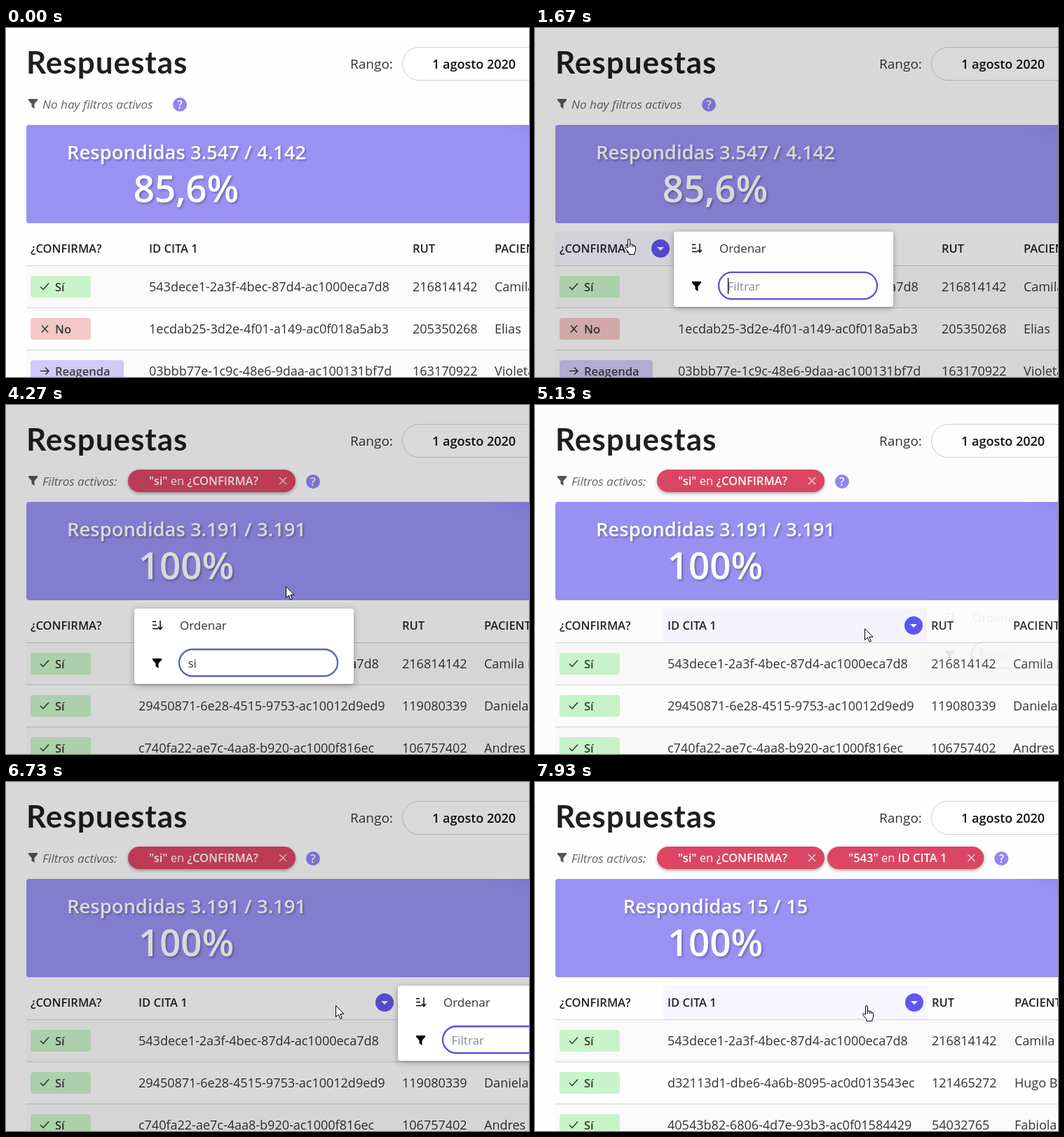
Recreate the animation shown at these times as an HTML page. Size 746 by 497 pixels, loop 8 s.

```html
<!DOCTYPE html>
<html lang="es">
<head>
<meta charset="utf-8">
<style>
html, body { margin: 0; height: 100%; overflow: hidden; background: #fefefe }
svg { display: block; font: 18px "Open Sans", sans-serif }
text { white-space: pre }
.title { font: 700 44px Lato, sans-serif; letter-spacing: 1px }
.semi { font-weight: 600 }
.small { font-size: 16.5px }
.menu { font-size: 17px }
.glow { filter: drop-shadow(2px 2px 1.5px #0004) }
.chip { filter: drop-shadow(0 2px 2px #0005) }
.panel { filter: drop-shadow(0 2px 4px #0005) }
</style>
</head>
<body>
<svg id="stage" width="746" height="497" viewBox="0 0 746 497"></svg>
<script>
const stage = document.getElementById('stage');
const pen = document.createElement('canvas').getContext('2d');
const LOOP = 8000;

// Table rows: answer, appointment id, RUT, patient
const first = ['Sí', '543dece1-2a3f-4bec-87d4-ac1000eca7d8', '216814142', 'Camila Ro'];
const second = ['Sí', '29450871-6e28-4515-9753-ac10012d9ed9', '119080339', 'Daniela E'];
const third = ['Sí', 'd32113d1-dbe6-4a6b-8095-ac0d013543ec', '121465272', 'Hugo Be'];
const all = [first,
  ['No', '1ecdab25-3d2e-4f01-a149-ac0f018a5ab3', '205350268', 'Elias'],
  ['Reagenda', '03bbb77e-1c9c-48e6-9daa-ac100131bf7d', '163170922', 'Violeta']];
const confirmed = [first, second,
  ['Sí', 'c740fa22-ae7c-4aa8-b920-ac1000f816ec', '106757402', 'Andres M']];

// id/rut: left edges of those columns
const wide = { id: 198, rut: 574, name: 697 }, tight = { id: 183, rut: 559, name: 682 };
const final = { id: 183, rut: 560, name: 684 };
const states = [
  { at: 0, ...wide, count: '3.547 / 4.142', rate: '85,6%', rows: all, typed: [] },
  { at: 2800, ...tight, count: '3.191 / 3.191', rate: '100%', rows: confirmed, typed: ['s'] },
  { at: 3000, ...tight, count: '3.191 / 3.191', rate: '100%', rows: confirmed, typed: ['si'] },
  { at: 7000, ...tight, count: '2.874 / 2.874', rate: '100%', typed: ['si', '5'],
    rows: [first, second, ['Sí', '5b1e0c47-3d92-4f0a-8c15-ac1000e92b31', '98412076', 'Ramona']] },
  { at: 7270, ...final, count: '418 / 418', rate: '100%', typed: ['si', '54'],
    rows: [first, third, ['Sí', 'c8540a17-62de-4b39-a7f1-ac0e00b7d245', '143920581', 'Nicolas']] },
  { at: 7470, ...final, count: '15 / 15', rate: '100%', typed: ['si', '543'],
    rows: [first, third, ['Sí', '40543b82-6806-4d7e-93b3-ac0f01584429', '54032765', 'Fabiola']] }
];
const columns = ['¿CONFIRMA?', 'ID CITA 1'];
const caretOn = [[1480, 2070], [2800, 3530], [4060, 4200], [5100, 5670], [6200, 6730], [7000, 7720]];
const path = [[130, 620, 505], [930, 267, 297], [1000, 267, 297], [1270, 112, 294], [1530, 112, 294],
  [1650, 131, 300], [3730, 131, 300], [4200, 399, 258], [4280, 399, 258], [4530, 217, 301],
  [4600, 217, 301], [4800, 470, 318]];

const within = (t, a, b) => t >= a && t < b;
const ramp = (t, a, b) => {
  const p = Math.min(1, Math.max(0, (t - a) / (b - a)));
  return p * p * (3 - 2 * p);
};
const rect = (x, y, w, h, r, attrs) => `<rect x="${x}" y="${y}" width="${w}" height="${h}" rx="${r}" ${attrs}/>`;
const text = (x, y, s, cls = '', fill = '#333', more = '') =>
  `<text x="${x}" y="${y}" class="${cls}" fill="${fill}" ${more}>${s}</text>`;
const line = (d, color, width = 1.5) =>
  `<path d="${d}" fill="none" stroke="${color}" stroke-width="${width}"/>`;
const shape = (d, fill, more = '') => `<path d="${d}" fill="${fill}" ${more}/>`;
const funnel = (x, y, fill) => shape(`M${x} ${y}h13v2l-4.5 5v7l-4-3v-4l-4.5-5z`, fill);
const measure = (s, weight) => {
  pen.font = `${weight} 16.5px "Open Sans", sans-serif`;
  return pen.measureText(s).width;
};

function pointer(t) {
  let i = 0;
  while (i < path.length - 2 && t >= path[i + 1][0]) i++;
  const [a, x, y] = path[i], [b, u, v] = path[i + 1];
  const p = Math.min(1, Math.max(0, (t - a) / (b - a))), e = p * (2 - p);
  return [x + (u - x) * e, y + (v - y) * e];
}

function cursor(x, y, hand) {
  const d = hand
    ? 'M4.5 13V2a1.5 1.5 0 0 1 3 0V8q3-1 3 1q2.5-1 2.5 1q2.5-.5 2.5 2V16q0 2-1.5 4V22.5H6V20L1 14q-1-2 .5-2.3T4.5 13zM7.5 8v4M10.5 9v3M13 10v2'
    : 'M.5.5V16.5L4.3 13l2.7 6.3 2.4-1-2.7-6H12z';
  return `<g transform="translate(${x - (hand ? 3 : 0)} ${y})">${shape(d, '#fff', 'stroke="#000" stroke-linejoin="round"')}</g>`;
}

function filters(typed) {
  let out = funnel(32, 101, '#555');
  out += text(52, 115, typed.length ? 'Filtros activos:' : 'No hay filtros activos', '', '#666',
    'font-style="italic" style="font-size:17.1px"');
  let x = typed.length ? 174 : 227;
  typed.forEach((word, i) => {
    const w = 83 + measure(`"${word}"`, 600) + measure(' en ', 400) + measure(columns[i], 600);
    const end = x + w;
    out += rect(x, 92, w, 32, 16, 'fill="#dc4663" class="chip"');
    out += text(x + 30, 114, `"${word}"<tspan font-weight="400"> en </tspan>${columns[i]}`, 'semi small', '#fff');
    out += line(`M${end - 23} 103l10 10m0-10l-10 10`, '#f6cdd5');
    x = end + 4;
  });
  x += 21;
  return out + `<circle cx="${x}" cy="109" r="10" fill="#9186f3"/>` +
    text(x, 115, '?', 'semi', '#fff', 'text-anchor="middle" style="font-size:16px"');
}

function answer(label, y) {
  const [fill, icon] = {
    'Sí': ['#c9f4c9', 'm49 0l4 4 8-9'],
    'No': ['#f5c7c7', 'm51-5l9 10m0-10l-9 10'],
    'Reagenda': ['#d2c9f5', 'm49 0h12m-5-5l5 5-5 5']
  }[label];
  return rect(35, y - 15.5, label === 'Reagenda' ? 133 : 86, 31, 4, `fill="${fill}"`) +
    line(`M0 ${y}${icon}`, '#333') + text(70, y + 6, label, 'semi small', '#3a3a3a');
}

function table(s, hover, tint) {
  let out = '';
  const left = [29, s.id], right = [s.id, s.rut];
  if (hover >= 0) {
    out += rect(left[hover], 290, right[hover] - left[hover], 48, 0, `fill="#f7f6ff" opacity="${tint}"`);
  }
  [[35, columns[0]], [s.id + 6, columns[1]], [s.rut + 6, 'RUT'], [s.name, 'PACIENTE']]
    .forEach(([x, label]) => out += text(x, 320, label, 'semi small', '#222'));
  if (hover >= 0) {
    const x = right[hover] - 19;
    out += `<circle cx="${x}" cy="314" r="13" fill="#6056f0"/>` + shape(`M${x - 5} 312h10l-5 5z`, '#fff');
  }
  s.rows.forEach(([label, id, rut, name], i) => {
    const y = 338 + 60 * i;
    if (i % 2 === 0) out += rect(29, y, 717, 60, 0, 'fill="#fafafa"');
    out += line(`M29 ${y + .5}H746`, '#cfd5d7', 1) + answer(label, y + 30.5);
    out += text(s.id + 6, y + 37, id) + text(s.rut + 6, y + 37, rut) + text(s.name, y + 37, name);
  });
  return out;
}

function menu(x, open, word, caret, border) {
  pen.font = '17px "Open Sans", sans-serif';
  const caretX = x + 77.5 + pen.measureText(word).width;
  return `<g opacity="${open}" transform="translate(0 ${-12 * (1 - open)})">` +
    rect(x, 290, 313, 107, 4, 'fill="#fff" class="panel"') +
    line(`M${x + 26} 308.5h5m-5 5h6m-6 5h8M${x + 37} 307v12m-3-3l3 3.5 3-3.5`, '#000') +
    text(x + 65, 320, 'Ordenar', 'menu') + funnel(x + 26, 361, '#000') +
    rect(x + 64, 348, 226, 38, 19, `fill="#fff" stroke="${border}" stroke-width="2.3"`) +
    text(x + 76.5, 374, word || 'Filtrar', 'menu', word ? '#333' : '#858b95') +
    (caret ? line(`M${caretX} 356V379`, '#000', 1.2) : '') + '</g>';
}

function draw(t) {
  const s = states.findLast(state => t >= state.at);
  const [x, y] = pointer(t);
  const second = t >= 5000;
  const open = second ? ramp(t, 5100, 5300) - ramp(t, 7720, 7930) : ramp(t, 1480, 1680) - ramp(t, 4280, 4500);
  const blurred = within(t, 3730, 4400);
  const inHeader = !blurred && y >= 290 && y < 338 && x < s.rut;
  const hover = inHeader ? +(x >= s.id) : -1;
  const hand = inHeader && !within(t, 5100, 7850);
  const center = 'text-anchor="middle"';

  let out = '<defs><linearGradient id="sheen" x1=".8" y1=".2" x2="1" y2="0">' +
    '<stop stop-color="#8f86f0" stop-opacity="0"/><stop offset="1" stop-color="#8f86f0"/></linearGradient></defs>';
  out += rect(0, 0, 746, 497, 0, 'fill="#fefefe"');
  out += text(29, 65, 'Respuestas', 'title', '#1c201e');
  out += text(491, 58, 'Rango:', '', '#333', 'style="font-size:19px"');
  out += rect(565.5, 27.5, 300, 47, 23.5, 'fill="#fff" stroke="#ccd0d4"') + text(608, 58, '1 agosto 2020', 'semi', '#111');
  out += filters(s.typed);
  out += rect(29, 138, 730, 140, 4, 'fill="#9a92f3"') + shape('M580 138H746V210Q680 160 580 138z', 'url(#sheen)', 'opacity=".6"');
  out += text(257.5, 187, 'Respondidas ' + s.count, 'semi glow', '#fff', center + ' style="font-size:27.4px"');
  out += text(257, 248, s.rate, 'semi glow', '#fff', center + ' style="font-size:53px"');
  out += table(s, hover, hover === 1 ? 1 - open : 1);
  if (open > 0) {
    out += rect(0, 0, 746, 497, 0, `fill="#000" opacity="${.15 * open}"`);
    out += menu(second ? s.rut : s.id, open, s.typed[+second] || '',
      caretOn.some(([a, b]) => within(t, a, b)), within(t, 4200, 5000) ? '#5a64b4' : '#5a50d8');
  }
  if (t >= 130) out += cursor(x, y, hand);
  return out;
}

let shown = '';
function tick() {
  const next = draw(performance.now() % LOOP);
  if (next !== shown) stage.innerHTML = shown = next;
  requestAnimationFrame(tick);
}
tick();
</script>
</body>
</html>
```
